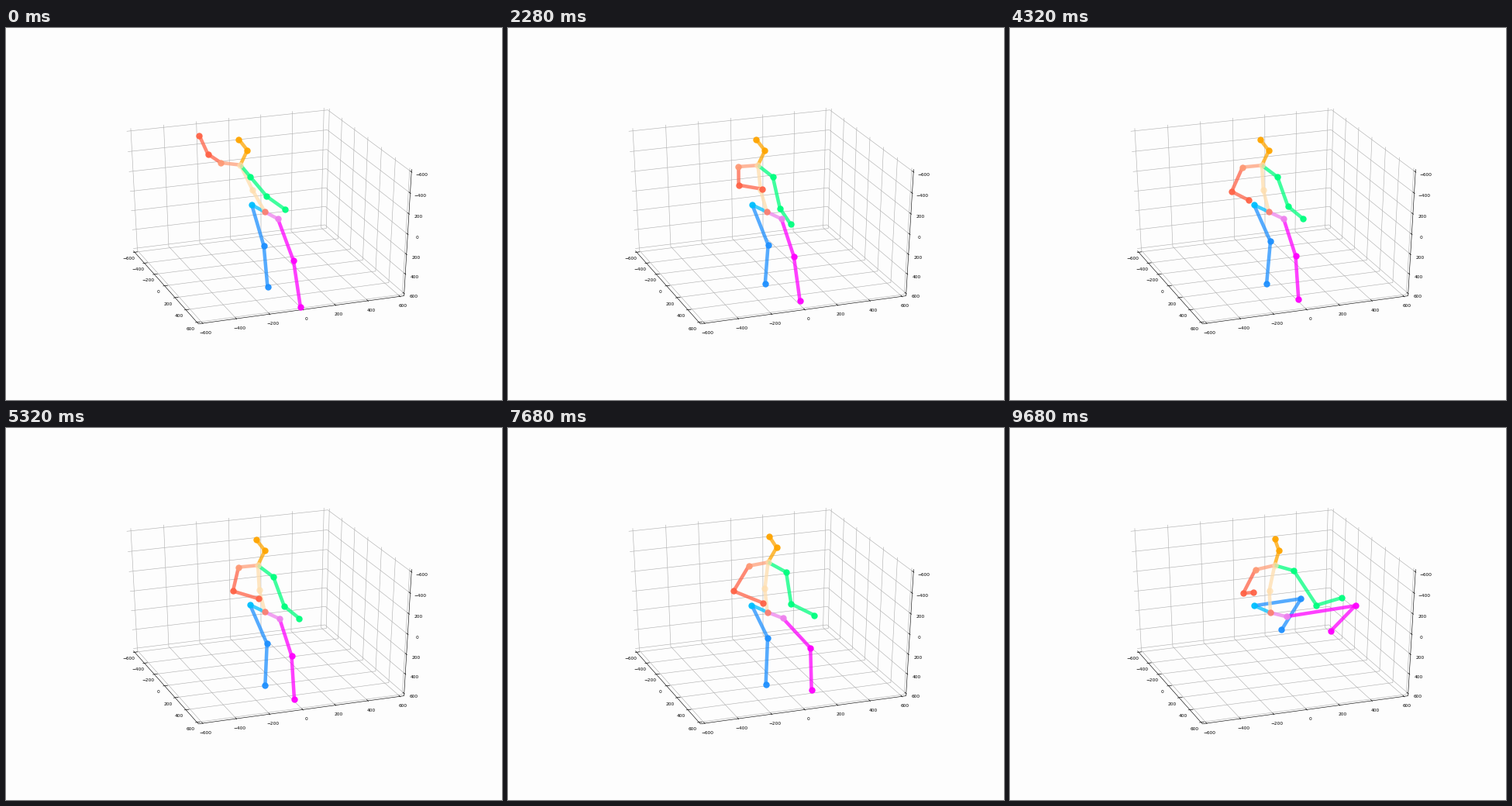
Animation, 640 px wide and 480 px high, one loop 9.72 s. Source, as a matplotlib script:

```python
import numpy as np
import matplotlib.pyplot as plt
from matplotlib.animation import FuncAnimation
from matplotlib.collections import LineCollection

W, H, DPI = 640, 480, 100
FRAMES, STEP = 243, 40
PT = 72 / DPI  # points per pixel

fig = plt.figure(figsize=(W / DPI, H / DPI), dpi=DPI, facecolor="#fdfdfd")
ax = fig.add_axes([0, 0, 1, 1])
ax.set_xlim(0, W)
ax.set_ylim(H, 0)
ax.axis("off")

# ---- perspective box -------------------------------------------------
AZIM, ELEV, DIST = np.radians(-20), np.radians(30), 10
CENTER, SCALE = np.array([334.4, 237.7]), np.array([2681, -1777])
EDGE = 0.5 + 1 / 48
ca, sa, ce, se = np.cos(AZIM), np.sin(AZIM), np.cos(ELEV), np.sin(ELEV)
RIGHT = np.array([-sa, ca, 0])
UP = np.array([-se * ca, -se * sa, ce])
TOWARD = np.array([ca * ce, sa * ce, se])


def project(*points):
    p = np.array(points, dtype=float)
    flat = np.stack([p @ RIGHT, p @ UP], axis=1)
    return CENTER + SCALE * flat / (DIST - p @ TOWARD)[:, None]


def label(point, text):
    x, y = project(point)[0]
    ax.text(x, y, text, fontsize=5.93 * PT, family="DejaVu Sans",
            ha="center", va="center")


def draw_box():
    e = EDGE
    grid, ticks = [], []
    for value in range(-600, 601, 200):
        t = value / 1200
        grid += [project((t, -e, -e), (t, e, -e), (t, e, e)),
                 project((e, t, -e), (-e, t, -e), (-e, t, e)),
                 project((-e, -e, t), (-e, e, t), (e, e, t))]
        inner, outer = e - 1 / 60, e + 1 / 120
        ticks += [project((t, -inner, -e), (t, -outer, -e)),
                  project((inner, t, -e), (outer, t, -e)),
                  project((inner, e, t), (outer, e, t))]
        text = str(value).replace("-", "\u2212")
        label((t, -e - 0.034, -e - 0.047), text)
        label((e + 0.043, t, -e - 0.054), text)
        # the vertical axis points down and shows 200 on both sides of 0
        label((e + 0.055, e + 0.026, -t), "200" if value == -200 else text)
    spines = [project((-e, -e, -e), (e, -e, -e), (e, e, -e), (e, e, e))]
    for lines, color in ((grid, "#b0b0b0"), (spines + ticks, "black")):
        ax.add_collection(LineCollection(lines, colors=color,
                                         linewidths=0.6 * PT, zorder=1))


# ---- motion ----------------------------------------------------------
T = np.arange(FRAMES)[:, None] * STEP / 1000


def ease(start, end):
    u = np.clip((T - start) / (end - start), 0, 1)
    return u * u * (3 - 2 * u)


def bump(peak, width):
    return np.exp(-((T - peak) / width) ** 2)


SWING = ease(0.4, 2.6) ** 2  # from the raised arm into the guard
LIFT = ease(6.6, 9.68)       # from the guard into the seat
SINK = np.hstack([LIFT, LIFT ** 2])  # the legs rise later than they open
WINDUP, DIP, PUNCH = bump(0.65, 0.6), bump(1.5, 0.7), bump(2.9, 0.8)
PULL, SHIFT, HOP = bump(4.4, 0.8), bump(6.3, 0.9), bump(7.6, 0.7)


def move(start, guard, seat, *accents):
    start, guard, seat = map(np.array, (start, guard, seat))
    path = start + SWING * (guard - start) + SINK * (seat - guard)
    return path + sum(when * np.array(by) for when, by in accents)


def offset(base, x, y):
    """Place a joint beside another one; x and y may vary with time."""
    return base + np.hstack([x + 0 * T, y + 0 * T])


J = {
    "pelvis": offset(np.array([334, 237.3]), 2 * LIFT, LIFT),
    "chest": move((302.4, 176.7), (325, 177.2), (341.5, 177.2),
                  (HOP, (6, -4))),
    "r_knee": move((332.7, 281.2), (337, 279.3), (375.5, 220.2),
                   (DIP, (-3, 1)), (PULL, (-1, -4)), (HOP, (-13, -4))),
    "r_foot": move((337.5, 334.2), (331, 330), (350.5, 260.3),
                   (SHIFT, (11, 8)), (HOP, (-5, 6))),
    "l_knee": move((371, 300.4), (368.5, 294), (445.5, 229.3),
                   (HOP, (0, -5))),
    "l_foot": move((380, 360.4), (372, 350), (413.5, 262.3),
                   (PUNCH, (7, 2)), (HOP, (8, -5))),
    "l_elbow": move((336.5, 217.2), (359, 230), (395.5, 228.7),
                    (DIP, (-6, 7)), (PUNCH, (-7, 4)), (HOP, (-4, -3))),
    "l_wrist": move((360, 233.7), (378.5, 245.7), (427.5, 219.2),
                    (DIP, (-20, 17)), (PUNCH, (-11, 7)), (HOP, (3, -2))),
    "r_elbow": move((260.5, 162.7), (295.5, 210.2), (301, 213.2),
                    (PUNCH, (11, -4)), (PULL, (-10, 1)), (HOP, (-6, 0))),
    "r_wrist": move((255, 143.7), (332.5, 219.5), (313.5, 212.2),
                    (WINDUP, (-18, -16)), (PUNCH, (7, -6)),
                    (PULL, (-25, 3)), (HOP, (2, 7))),
}

# the torso turns as it leans: the other joints follow from chest and pelvis
lean, height = np.hsplit(J["chest"] - J["pelvis"], 2)
hips = 20 + 0.1 * lean
J["spine"] = offset(J["pelvis"], 0.39 * lean - 3.6, 0.5 * height + 2)
J["neck"] = offset(J["chest"], 9 - 3.5 * LIFT + 3 * HOP, -19)
J["head"] = offset(J["neck"], -11 + 5.5 * LIFT, -14 - 1.5 * LIFT)
J["r_hip"] = offset(J["pelvis"], -hips, -9)
J["l_hip"] = offset(J["pelvis"], hips, 9 - 4 * LIFT)
J["r_shoulder"] = offset(J["chest"], -25, 4.5 + 0.23 * lean)
J["l_shoulder"] = offset(J["chest"], 23 + 0.33 * lean, 15 - 8 * LIFT)

# ---- skeleton --------------------------------------------------------
CHAINS = [
    ("pelvis r_hip r_knee r_foot", "deepskyblue dodgerblue dodgerblue"),
    ("pelvis l_hip l_knee l_foot", "violet magenta magenta"),
    ("pelvis spine chest neck head", "navajowhite navajowhite orange orange"),
    ("chest l_shoulder l_elbow l_wrist", "springgreen springgreen springgreen"),
    ("chest r_shoulder r_elbow r_wrist", "lightsalmon tomato tomato"),
]
BONES = []
for joints, colors in CHAINS:
    names = joints.split()
    BONES += zip(names, names[1:], colors.split())
DOTS = {end: color for _, end, color in BONES}
DOTS.update(pelvis="salmon", r_shoulder="#fd9a76")
PALE = ("spine", "chest")

draw_box()
bones = [ax.plot([], [], color=c, lw=4.5 * PT, alpha=0.75, zorder=3,
                 solid_capstyle="butt")[0] for _, _, c in BONES]
dots = {name: ax.plot([], [], "o", color=c, ms=8.4 * PT, mew=0, zorder=4,
                      alpha=0.75 if name in PALE else 0.95)[0]
        for name, c in DOTS.items()}


def update(i):
    for line, (a, b, _) in zip(bones, BONES):
        line.set_data(*np.array([J[a][i], J[b][i]]).T)
    for name, dot in dots.items():
        dot.set_data(*J[name][i:i + 1].T)
    return bones + list(dots.values())


anim = FuncAnimation(fig, update, frames=FRAMES, interval=STEP, repeat=True,
                     repeat_delay=0)
plt.show()
```
